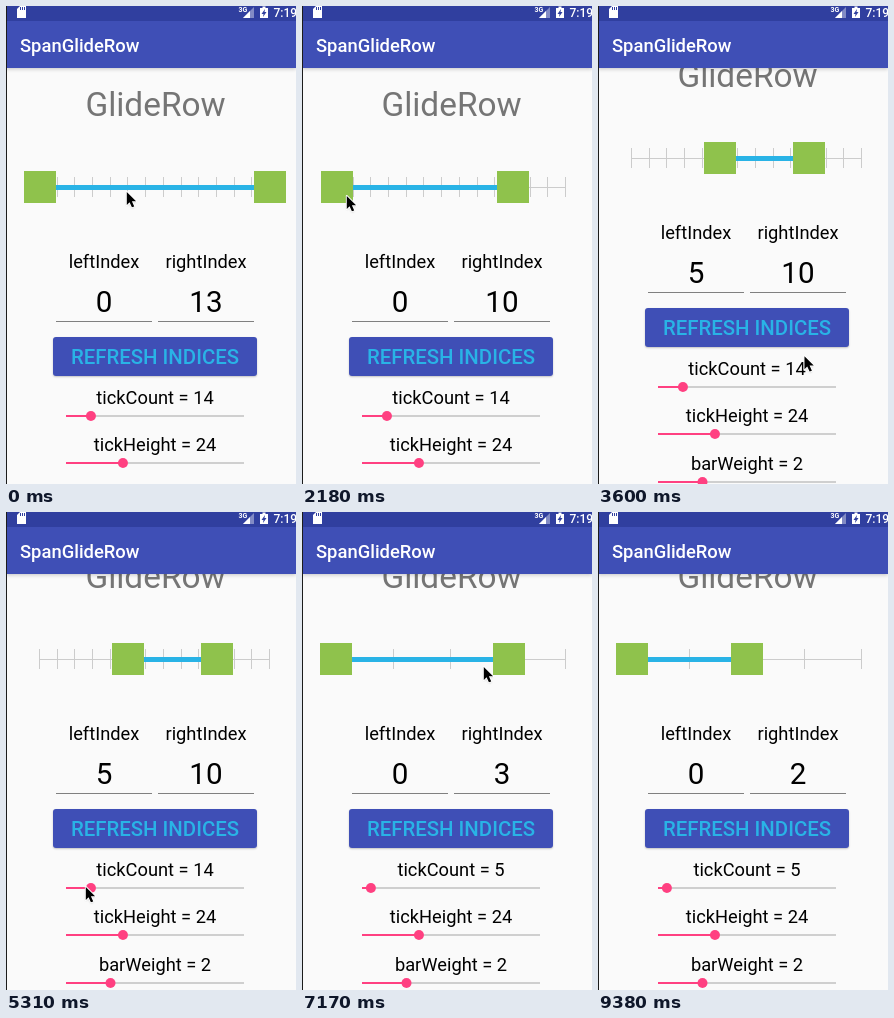
An HTML page with a canvas that plays this animation: 290 by 478 pixels, repeating every 9610 ms.

```html
<!DOCTYPE html>
<html lang="en">
<head>
<meta charset="utf-8">
<title>Range slider demo</title>
<style>
  html, body { margin: 0; width: 100%; height: 100%; overflow: hidden; background: #fafafa; }
  canvas { display: block; }
</style>
</head>
<body>
<canvas id="stage" width="290" height="478"></canvas>
<script>
const ctx = document.getElementById('stage').getContext('2d');
const LOOP = 9610, STEP = 88.5, PHASE = 55;
const BAR_LEFT = 34, BAR_RIGHT = 264, BAR_Y = 181;
const SEEK_LEFT = 60, SEEK_WIDTH = 178, TOUCH_SLOP = 7;
const BLUE = '#29b3e6', PINK = '#ff4081', GREEN = '#8fc24c', INDIGO = '#3f4fb6', NAVY = '#303f9f';

// What the hand does: [start step, steps, x, y, what is dragged].
const MOVES = [
  [-1, 7, 264, 186],
  [6, 7, 101, 187, 'right'],
  [14, 6, 209, 187, 'right'],
  [20, 3.8, 43, 189],
  [23.8, 3.2, 130, 188, 'left'],
  [29, 7, 200, 388],
  [37, 3.5, 206, 347, 'scroll'],
  [44, 3, 79, 374],
  [59, 5, 63, 375, 'count'],
  [64, 5, 264, 152],
  [69, 7, 164, 154, 'right'],
  [76, 4, 181, 154, 'right'],
  [81, 3, 203, 151],
  [85, 5, 146, 150, 'right'],
  [91, 6, 40, 148],
  [97, 6, 230, 456],
  [103, 2, 262, 490]
];

const clamp = (v, lo, hi) => Math.max(lo, Math.min(hi, v));
const smooth = u => u * u * (3 - 2 * u);
const mix = (a, b, u) => a + (b - a) * u;
const gapOf = count => (BAR_RIGHT - BAR_LEFT) / (count - 1);

function dragThumb(s, side, dx, dropped) {
  const gap = gapOf(s.count);
  const pos = clamp(s.thumbs[side] + dx, BAR_LEFT, BAR_RIGHT);
  s.index[side] = Math.round((pos - BAR_LEFT) / gap);
  s.thumbs[side] = dropped ? BAR_LEFT + s.index[side] * gap : pos;
}

function setCount(s, count) {
  s.count = count;
  if (s.index[1] >= count) s.index = [0, count - 1];
  s.thumbs = s.index.map(i => BAR_LEFT + i * gapOf(count));
}

// Replays the moves up to the given step.
function stateAt(step) {
  const s = { x: 120, y: 185, scroll: 0, index: [0, 13] };
  setCount(s, 14);
  MOVES.forEach(([start, steps, x, y, what], i) => {
    if (step < start) return;
    const u = Math.min(1, (step - start) / steps);
    const from = s.x, fromY = s.y;
    s.x = mix(from, x, smooth(u));
    s.y = mix(fromY, y, smooth(u));
    const dx = s.x - from;
    const held = MOVES[i + 1] && MOVES[i + 1][4] === what;
    if (what === 'left') dragThumb(s, 0, dx, u === 1 && !held);
    if (what === 'right') dragThumb(s, 1, dx, u === 1 && !held);
    if (what === 'count') setCount(s, Math.round(s.count + dx * 100 / SEEK_WIDTH));
    if (what === 'scroll') s.scroll = Math.round((fromY - y - TOUCH_SLOP) * u);
  });
  return s;
}

function box(x, y, w, h, color) {
  ctx.fillStyle = color;
  ctx.fillRect(x, y, w, h);
}

function text(str, x, y, size, color, weight = 400, align = 'center') {
  ctx.font = `${weight} ${size}px Roboto, sans-serif`;
  ctx.textAlign = align;
  ctx.fillStyle = color;
  ctx.fillText(str, x, y);
}

function shape(points, color) {
  ctx.beginPath();
  points.forEach(([x, y]) => ctx.lineTo(x, y));
  ctx.closePath();
  ctx.fillStyle = color;
  ctx.fill();
}

function shadow(alpha, blur, dy) {
  ctx.shadowColor = `rgba(0,0,0,${alpha})`;
  ctx.shadowBlur = blur;
  ctx.shadowOffsetY = dy;
}

function drawRange(s) {
  box(BAR_LEFT, BAR_Y, BAR_RIGHT - BAR_LEFT, 1, '#cccccc');
  for (let i = 0; i < s.count; i++) {
    box(Math.round(BAR_LEFT + i * gapOf(s.count)) - 1, BAR_Y - 10, 1, 20, '#cccccc');
  }
  box(s.thumbs[0], BAR_Y - 2, s.thumbs[1] - s.thumbs[0], 5, BLUE);
  s.thumbs.forEach(x => box(Math.round(x) - 16, BAR_Y - 16, 32, 32, GREEN));
}

function drawField(label, value, x) {
  text(label, x, 262, 18.3, '#000');
  text(value, x, 306, 29.6, '#000');
  box(x - 48, 315, 96, 1, '#808080');
}

function drawButton() {
  ctx.save();
  shadow(0.22, 2, 1);
  ctx.beginPath();
  ctx.roundRect(47, 331, 204, 39, 3);
  ctx.fillStyle = INDIGO;
  ctx.fill();
  ctx.restore();
  text('REFRESH INDICES', 149, 358, 20.4, BLUE, 500);
}

function drawSeek(label, value, part, row) {
  const y = Math.round(410 + row * 47.3), length = SEEK_WIDTH * part;
  text(`${label} = ${value}`, 149, y - 12, 18.3, '#000');
  box(SEEK_LEFT, y - 1, SEEK_WIDTH, 2, '#cfcfcf');
  box(SEEK_LEFT, y - 1, length, 2, PINK);
  ctx.beginPath();
  ctx.arc(SEEK_LEFT + length, y, 5, 0, Math.PI * 2);
  ctx.fillStyle = PINK;
  ctx.fill();
}

function drawHeader() {
  ctx.save();
  shadow(0.22, 4, 1);
  box(0, 15, 290, 47, INDIGO);
  ctx.restore();
  box(0, 0, 290, 15, NAVY);
  text('SpanGlideRow', 14, 46, 18.4, '#fff', 500, 'left');

  // memory card
  shape([[14, 0], [20, 0], [20, 12], [11, 12], [11, 3]], '#fff');
  for (let x = 14; x < 19; x += 2) box(x, 1, 1, 3, NAVY);
  // signal
  shape([[248, 1], [248, 12], [237, 12]], 'rgba(255,255,255,.4)');
  shape([[244, 5], [244, 12], [237, 12]], '#fff');
  text('3G', 232.5, 6, 7, '#fff', 700, 'left');
  // battery
  box(254, 2, 8, 10, '#fff');
  box(256.5, 0.5, 3, 2, '#fff');
  shape([[259, 3], [255.5, 8], [257.5, 8], [257, 11], [260.5, 6], [258.5, 6]], NAVY);
  text('7:19', 267.5, 11, 12, '#fff', 500, 'left');
}

function drawPointer(x, y) {
  const arrow = [[0, 0], [0, 14], [3, 11], [5.5, 16.5], [8, 15.5], [5.5, 10], [10, 10]];
  ctx.save();
  ctx.translate(x + 0.8, y + 1);
  ctx.scale(0.93, 0.93);
  shadow(0.3, 2, 1);
  shape(arrow, '#000');
  ctx.shadowColor = 'transparent';
  ctx.lineWidth = 2;
  ctx.lineJoin = 'round';
  ctx.strokeStyle = '#fff';
  ctx.stroke();
  shape(arrow, '#000');
  ctx.restore();
}

function draw(s) {
  box(0, 0, 290, 478, '#fafafa');
  ctx.save();
  ctx.translate(0, -s.scroll);
  text('GlideRow', 149.5, 110, 33.4, '#757575');
  drawRange(s);
  drawField('leftIndex', s.index[0], 98);
  drawField('rightIndex', s.index[1], 200);
  drawButton();
  drawSeek('tickCount', s.count, s.count / 100, 0);
  drawSeek('tickHeight', 24, 0.32, 1);
  drawSeek('barWeight', 2, 0.25, 2);
  ctx.restore();
  drawHeader();
  box(0, 0, 1, 478, '#1c1c1c');
  drawPointer(s.x, s.y);
}

const begin = performance.now();
function tick() {
  const ms = (performance.now() - begin) % LOOP;
  draw(stateAt(Math.floor((ms - PHASE) / STEP)));
  requestAnimationFrame(tick);
}
tick();
</script>
</body>
</html>
```
